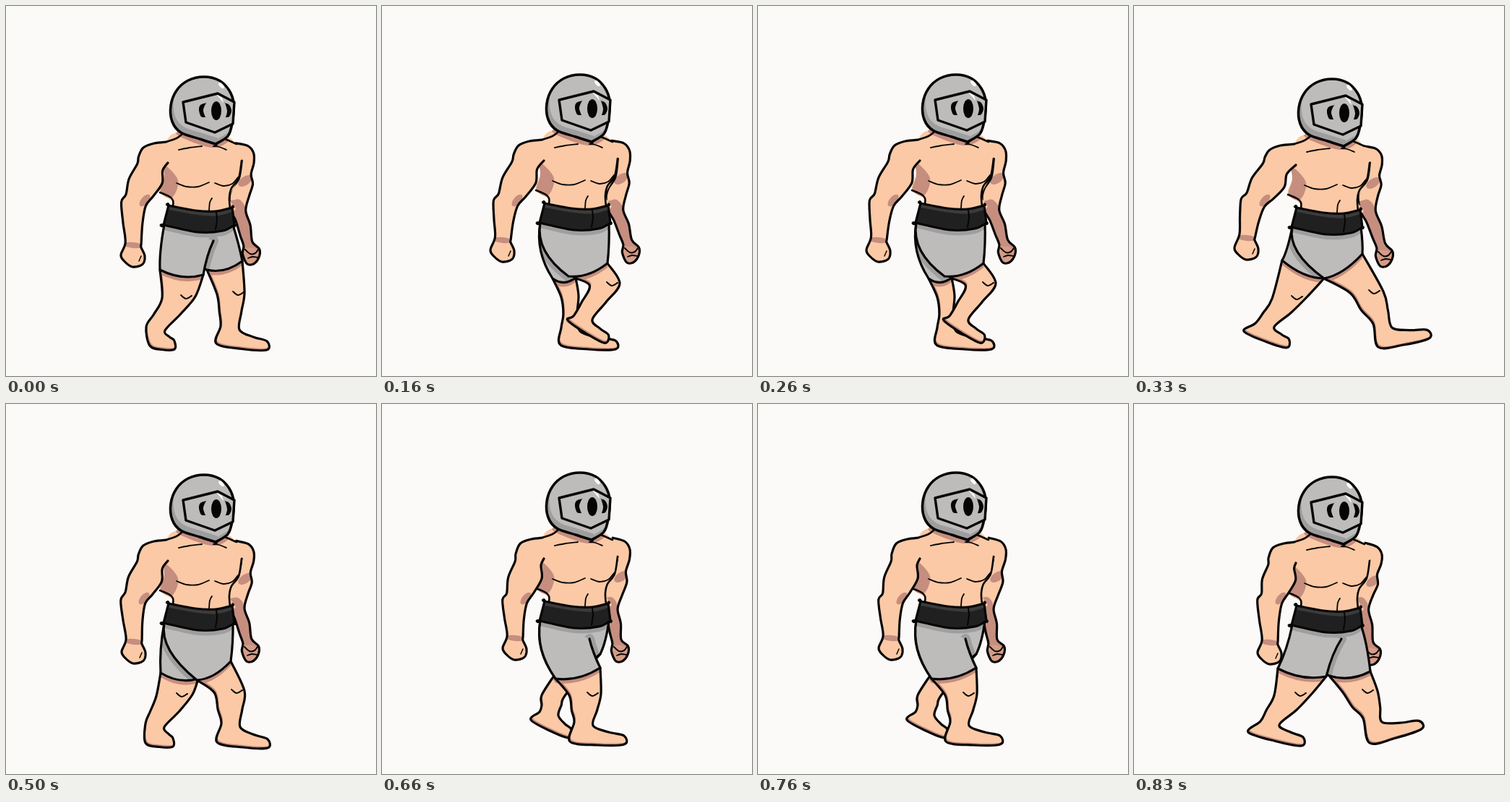
Recreate the animation shown at these times as an HTML page with a canvas. Size 512x512 px, loop 1 s.

```html
<!DOCTYPE html>
<html lang="en">
<head>
<meta charset="utf-8">
<title>Knight walk</title>
<style>
html, body { margin: 0; height: 100%; overflow: hidden; background: #fcfaf8; }
canvas { display: block; }
</style>
</head>
<body>
<canvas id="stage" width="512" height="512"></canvas>
<script>
const ctx = document.getElementById('stage').getContext('2d');
const INK = '#060505', SKIN = '#fbc9a5', SHADE = '#c58e7f', KNUCKLE = '#d59c87';
const STEEL = '#bdbcbb', STEEL_SHADE = '#9f9e9e';

const STEP_ENDS = [160, 330, 500, 660, 830, 1000];
// One entry per step. Arms: elbow x, wrist x, wrist y.
const NEAR_ARM = ['180 176 331', '175 167 324', '169 156 321', '179 177 329', '187 184 324', '191 188 330'];
const FAR_ARM = ['323 333 328', '324 338 326', '324 340 331', '321 332 327', '319 323 327', '317 323 331'];
// Legs: half width, then knee, ankle, heel and toe.
const FRONT_LEG = [
  '23 239 403 207 446 199 470 233 469', '21 308 385 278 431 257 435 311 461',
  '23 322 396 344 442 338 472 407 454', '21 309 398 311 444 292 468 362 470',
  '22 281 402 279 442 260 467 335 465', '26 220 402 188 441 158 454 233 467'];
const BACK_LEG = [
  '19 311 398 310 445 291 467 361 470', '12 260 402 261 447 247 469 323 469',
  '24 215 404 181 441 152 450 213 467', '25 233 403 206 444 193 469 231 468',
  '17 238 402 231 428 206 437 260 456', '24 313 398 330 437 326 469 396 444'];
// Hems of the shorts, left end to right end.
const FRONT_HEM = ['213 365 273 372', '258 374 312 356', '263 377 316 343', '264 382 311 356', '240 380 302 365', '199 366 266 377'];
const BACK_HEM = ['278 365 327 353', '236 377 268 376', '205 352 263 377', '214 372 266 380', '238 376 302 346', '270 376 327 370'];

function pairs(text) {
  const n = text.split(' ').map(Number);
  return n.filter((_, i) => i % 2 === 0).map((x, i) => [x, n[i * 2 + 1]]);
}

const add = ([x, y], dx, dy) => [x + dx, y + dy];
const mix = (a, b, t = 0.5) => [a[0] + (b[0] - a[0]) * t, a[1] + (b[1] - a[1]) * t];

// Points beside a bone: share of its length, then distance to its side.
function beside(from, to, text) {
  const length = Math.hypot(to[0] - from[0], to[1] - from[1]);
  const [ux, uy] = [(to[0] - from[0]) / length, (to[1] - from[1]) / length];
  return pairs(text).map(([t, side]) => add(mix(from, to, t), -uy * side, ux * side));
}

// Smooth curve through points; a repeated point is a corner.
function curve(p, closed = false, bend = 1 / 6) {
  if (typeof p === 'string') p = pairs(p);
  const n = p.length, path = new Path2D();
  const at = i => closed ? p[(i + n) % n] : p[Math.max(0, Math.min(n - 1, i))];
  path.moveTo(...p[0]);
  for (let i = 0; i < n - (closed ? 0 : 1); i++) {
    const [a, b, c, d] = [at(i - 1), at(i), at(i + 1), at(i + 2)];
    path.bezierCurveTo(
      b[0] + (c[0] - a[0]) * bend, b[1] + (c[1] - a[1]) * bend,
      c[0] - (d[0] - b[0]) * bend, c[1] - (d[1] - b[1]) * bend, ...c);
  }
  if (closed) path.closePath();
  return path;
}

function fill(path, color, dx = 0, dy = 0) {
  ctx.save();
  ctx.translate(dx, dy);
  ctx.fillStyle = color;
  ctx.fill(path);
  ctx.restore();
}

function stroke(path, width = 3.2, color = INK) {
  ctx.lineWidth = width;
  ctx.strokeStyle = color;
  ctx.stroke(path);
}

function oval([x, y], rx, ry, color, turn = 0) {
  const path = new Path2D();
  path.ellipse(x, y, rx, ry, turn, 0, 7);
  fill(path, color);
}

function shape(path, color, shade, width) {
  fill(path, color);
  ctx.save();
  ctx.clip(path);
  shade();
  ctx.restore();
  stroke(path, width);
}

const line = (p, width = 1.8) => stroke(curve(p), width);
const mark = (origin, text, width) => line(pairs(text).map(p => add(p, ...origin)), width);

function drawLeg(text, hem, cloths) {
  const [width, ...rest] = text.split(' ');
  const w = +width, [knee, ankle, heel, toe] = pairs(rest.join(' '));
  const [left, right] = pairs(hem), calf = mix(knee, ankle);
  const instep = add(ankle, 13, 3), [toeTop, toeTip] = beside(heel, toe, '1 -6 1 6');
  const leg = curve([
    left, add(knee, -w, 1), add(calf, -w * 0.8, 2), add(ankle, -13, -2),
    heel, add(mix(heel, toe), 0, 6), toeTip, toeTop, add(mix(instep, toeTop), 0, 2),
    instep, add(calf, w * 0.8, 2), add(knee, w, -1), right]);
  shape(leg, SHADE, () => {
    fill(leg, SKIN, 2, -3);
    cloths.forEach(cloth => fill(cloth, SHADE, 0, 6));
  });
  if (w > 17) mark(knee, '3 -3 10 2 18 -2', 2);
}

function clothPath(hem, rise, creased) {
  const [a, b] = pairs(hem), sag = mix(a, b), path = new Path2D();
  path.moveTo(219, 303 + rise);
  path.quadraticCurveTo(212, 340, ...a);
  path.quadraticCurveTo(sag[0], sag[1] + 12, ...b);
  if (creased) path.quadraticCurveTo(b[0] / 2 + 141, 345, 287, 325);
  else path.quadraticCurveTo(b[0] / 2 + 159, 330, 314, 303 + rise);
  return path;
}

function drawFarArm(text, rise) {
  const [elbowX, wristX, wristY] = text.split(' ').map(Number);
  const shoulder = [330, 208 + rise], elbow = [elbowX, 267], wrist = [wristX, wristY];
  const hand = add(wrist, 7, 29);
  const arm = curve([
    ...beside(shoulder, elbow, '-.28 14 -.25 -3 -.1 -12 .13 -14 .4 -12 .62 -16 .9 -13'),
    ...beside(elbow, wrist, '.28 -6 .62 -9 .99 -8'),
    ...beside(wrist, hand, '.39 -15 .72 -13 1 -4 .95 6 .45 9 .1 5'),
    ...beside(elbow, wrist, '.82 7 .46 10 .24 14'),
    ...beside(shoulder, elbow, '1 14 .78 12 .52 4 .11 3')]);
  shape(arm, SKIN, () => {
    oval(add(shoulder, 1, 34), 11, 6, SHADE, -0.6);
    fill(curve([...beside(elbow, wrist, '.2 30 0 6 .1 -4 .4 -8'), ...beside(wrist, hand, '0 -16 1.2 -25 1.2 25')], true), SHADE);
    oval(mix(wrist, hand, 0.6), 14, 11, KNUCKLE);
  });
  mark(wrist, '-2 9 5 15 12 14 16 9', 2);
  mark(wrist, '2 21 8 19 15 20');
}

function drawNearArm(text, rise) {
  const [elbowX, wristX, wristY] = text.split(' ').map(Number);
  const shoulder = [203 + (elbowX - 180) * 0.2, 208 + rise];
  const elbow = [elbowX, 266], wrist = [wristX, wristY], hand = add(wrist, 0, 30);
  const arm = curve([
    [222, 188 + rise], add(shoulder, 2, -18), add(shoulder, -13, -12),
    ...beside(shoulder, elbow, '.12 18 .28 16 .66 19 1 15'),
    ...beside(elbow, wrist, '.1 20 .53 16 .95 11'),
    ...beside(wrist, hand, '.45 17 .75 12 1 1 .88 -13 .5 -16 .1 -11'),
    ...beside(elbow, wrist, '.95 -11 .53 -11 .15 -14'),
    ...beside(shoulder, elbow, '.82 -21 .48 -26 .21 -20'), [224, 217 + rise]]);
  shape(arm, SKIN, () => {
    oval(add(elbow, 12, 3), 5, 10, SHADE, 0.7);
    oval(wrist, 14, 4, SHADE, 0.1);
  });
  mark(wrist, '11 15 8 22', 1.5);
}

function drawTorso() {
  fill(curve('244 174 222 188 219 234 213 257 231 271 230 282 313 284 309 265 322 238 326 214 327 197 318 191 303 180', true), SKIN);
  fill(curve('219 220 238 241 230 265 214 258 219 238', true), SHADE);
  fill(curve('243 174 241 181 285 196 306 184', true), SHADE);
  line('244 177 236 183 222 188', 2.6);
  line('303 184 310 187 319 191', 2.6);
  line('213 258 225 263 231 269 231 279', 2.6);
  line('326 214 322 238 312 252 309 265 310 280', 2.6);
  line('239 199 254 196 271 194');
  line('287 194 295 195 305 199');
  line('236 245 250 250 266 250 281 244');
  line('289 245 301 249 313 246 321 237');
  line('285 266 282 272 281 283');
}

const belt = curve('225 276 225 276 262 283 290 284 313 279 313 279 316 303 316 303 300 311 266 313 218 303 218 303', true);

function drawBelt() {
  shape(belt, '#202020', () => line2('224 279 262 286 290 288 314 282'));
  line('291 286 292 295 290 309', 2);
}

const line2 = text => stroke(curve(text), 5, '#3b3b3c');

const dome = curve('274 98 295 103 309 117 315 135 313 162 307 180 290 191 290 191 268 184 242 175 230 160 228 138 236 117 252 103', true);
const visor = curve('245 133 293 121 316 133 314 163 289 175 249 161', true, 0);

function drawHelmet() {
  shape(dome, STEEL_SHADE, () => fill(dome, STEEL, 4, -8), 3.6);
  oval([298, 110], 2.5, 5, '#fff', -0.7);
  fill(visor, STEEL);
  fill(curve('291 122 299 127 301 134', true, 0), '#fff');
  stroke(visor, 3.4);
  oval([291, 145], 7, 13, INK);
  fill(curve('277 134 277 134 269 137 267 144 270 153 276 154 276 154 273 144', true), INK);
  fill(curve('303 134 303 134 309 137 312 145 309 153 304 154 304 154 306 145', true), INK);
}

function drawShorts(front, back, rise) {
  shape(back, STEEL, () => {
    stroke(front, 14, STEEL_SHADE);
    fill(belt, STEEL_SHADE, 0, rise + 7);
  });
  shape(front, STEEL, () => fill(belt, STEEL_SHADE, 0, rise + 7));
}

function drawKnight(step) {
  const rise = [0, -3, 3][step % 3], creased = step === 0 || step > 3;
  const front = clothPath(FRONT_HEM[step], rise, creased);
  const back = clothPath(BACK_HEM[step], rise, false);
  drawFarArm(FAR_ARM[step], rise);
  drawLeg(BACK_LEG[step], BACK_HEM[step], [front, back]);
  drawLeg(FRONT_LEG[step], FRONT_HEM[step], [front]);
  drawShorts(front, back, rise);
  ctx.save();
  ctx.translate(0, rise);
  drawTorso();
  drawBelt();
  ctx.restore();
  drawNearArm(NEAR_ARM[step], rise);
  ctx.save();
  ctx.translate(0, rise);
  drawHelmet();
  ctx.restore();
}

ctx.lineCap = ctx.lineJoin = 'round';

function tick() {
  const time = performance.now() % 1000;
  ctx.fillStyle = '#fcfaf8';
  ctx.fillRect(0, 0, 512, 512);
  drawKnight(STEP_ENDS.findIndex(end => time < end));
  requestAnimationFrame(tick);
}
tick();
</script>
</body>
</html>
```
